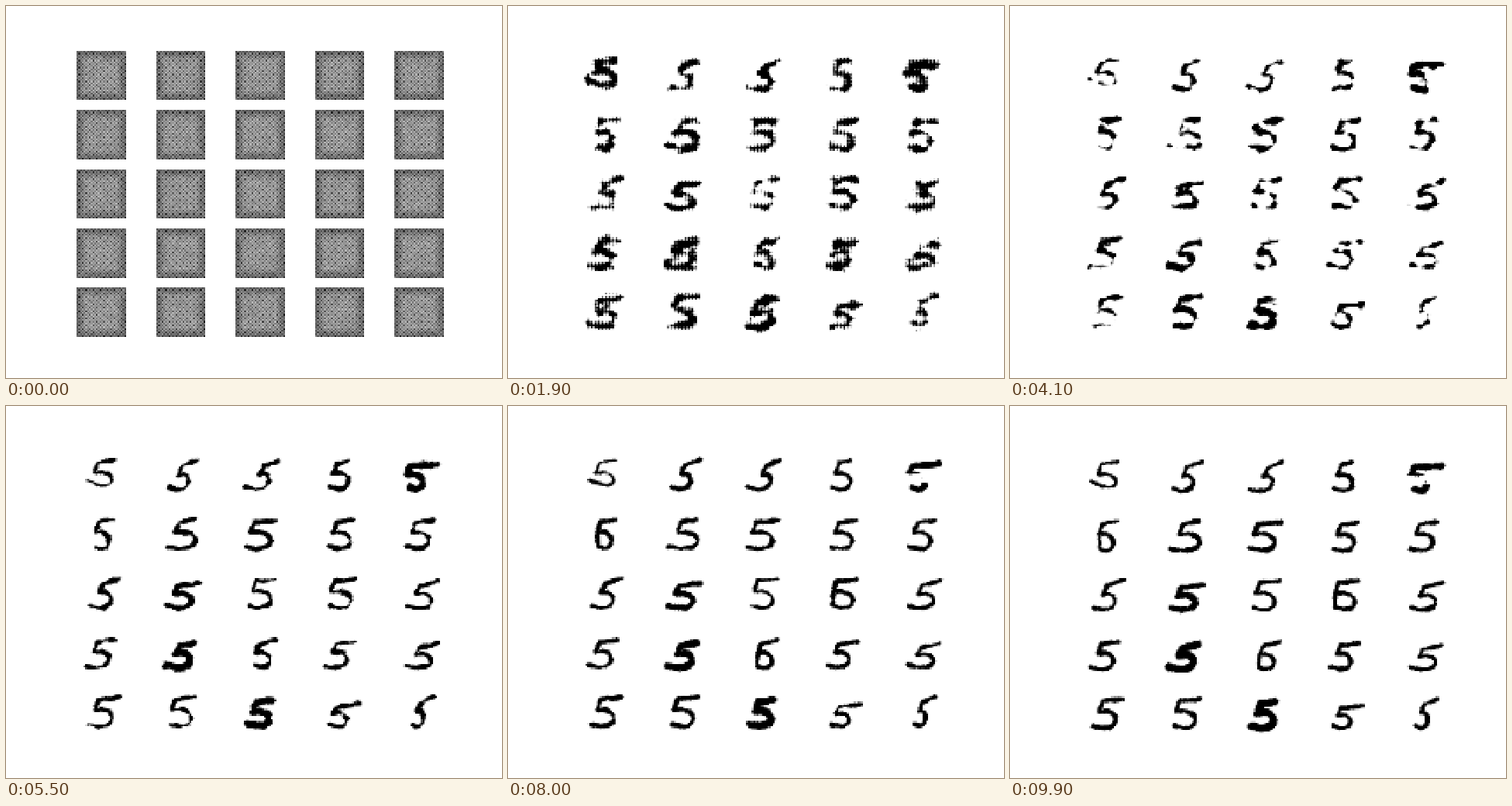
An HTML page with a canvas that plays this animation: 640x480 px, repeating every 10000 ms.

```html
<!DOCTYPE html>
<html lang="en">
<head>
<meta charset="utf-8">
<title>Digits learning to form</title>
<style>
html, body { margin: 0; width: 100%; height: 100%; overflow: hidden; background: #fff; }
canvas { display: block; }
</style>
</head>
<body>
<canvas id="stage" width="640" height="480"></canvas>
<script>
const N = 28, SIZE = 63.72;
const ctx = document.getElementById('stage').getContext('2d');
ctx.imageSmoothingEnabled = false;
const tile = document.createElement('canvas');
tile.width = tile.height = N;
const tileCtx = tile.getContext('2d');
const image = tileCtx.createImageData(N, N);

// Each digit: bar tip x, bar tip y, corner x, bowl right x, tail x
const digits = [
  [21, 5.2, 12, 20, 6], [24, 5.2, 15, 18.5, 7.5], [24, 5.2, 16, 18.5, 6], [18.5, 5.5, 12.5, 19, 8.5], [24.5, 7.5, 9, 16, 9],
  [21, 5.3, 12.5, 18.5, 11], [21.5, 5.3, 13, 22.5, 6], [23.5, 6, 10.5, 20, 6], [22.5, 5.8, 12.5, 20, 8], [21.5, 6, 12, 19.5, 7],
  [24.5, 5, 15, 19.5, 7.5], [24, 8, 12, 20, 6], [22.5, 5.5, 11.5, 20, 8], [22.5, 5.5, 11, 20.5, 9], [25, 6.5, 14.5, 21, 7],
  [21.5, 6.5, 12, 18.5, 6], [22, 8, 13, 19, 5], [22.5, 6.8, 13.5, 19.5, 11], [23, 7.5, 12, 18, 6], [24.5, 8.5, 14, 21, 7],
  [24, 5.5, 12.5, 20, 7], [22.5, 5.5, 11, 20, 8], [20, 7, 12, 19, 7], [25, 9.5, 12.5, 18, 8], [22, 5.5, 15, 16.5, 10]
];
const blobInk = [9, 3, 5, 3, 6, 3, 9, 5, 5, 3, 6, 4, 2, 7, 9, 8, 9, 6, 8, 6, 7, 7, 4, 4, 3];
const extraWeight = { 0: -.3, 4: .6, 11: .4, 12: -.2, 16: .9, 22: .9, 24: -.1 };
const closedBowl = [5, 13, 17];

const clamp = v => Math.max(0, Math.min(1, v));
const mix = (a, b, t) => a + (b - a) * t;
const smooth = t => t * t * (3 - 2 * t);

function track(keys, f) {
  if (f <= keys[0][0]) return keys[0][1];
  for (let i = 1; i < keys.length; i++) {
    const [a, u] = keys[i - 1], [b, v] = keys[i];
    if (f <= b) return mix(u, v, (f - a) / (b - a));
  }
  return keys[keys.length - 1][1];
}

function hash(x, y, z, seed) {
  let h = Math.imul(x + 11, 374761393) ^ Math.imul(y + 23, 668265263)
    ^ Math.imul(z + 37, 2147483647) ^ Math.imul(seed + 5, 1274126177);
  h = Math.imul(h ^ (h >>> 13), 1103515245);
  h = Math.imul(h ^ (h >>> 15), 1597334677);
  return ((h ^ (h >>> 16)) >>> 0) / 2147483648 - 1;
}

function noise(x, y, z, seed) {
  const i = Math.floor(x), j = Math.floor(y), k = Math.floor(z);
  const u = smooth(x - i), v = smooth(y - j), w = smooth(z - k);
  const layer = n => mix(
    mix(hash(i, j, n, seed), hash(i + 1, j, n, seed), u),
    mix(hash(i, j + 1, n, seed), hash(i + 1, j + 1, n, seed), u), v);
  return mix(layer(k), layer(k + 1), w);
}

function skeleton([ax, ay, bx, dx, fx], index) {
  const by = ay + Math.max(1, (bx - 10) * .6);
  const cx = bx - 2, cy = by * .5 + 9.3;
  const fy = index ? 20.8 : 16.5;
  const pull = (8 * dx - cx - fx) / 6;
  const points = [[ax, ay], [bx, by], [cx, cy]];
  for (let i = 1; i <= 8; i++) {
    const t = i / 8, s = 1 - t;
    const curve = (a, b, c, d) => s * s * s * a + 3 * s * s * t * b + 3 * s * t * t * c + t * t * t * d;
    points.push([curve(cx, pull, pull, fx), curve(cy, cy - 3, 26.5, fy)]);
  }
  return points;
}

function segmentDistance(x, y, [ax, ay], [bx, by]) {
  const dx = bx - ax, dy = by - ay;
  const t = clamp(((x - ax) * dx + (y - ay) * dy) / (dx * dx + dy * dy));
  return Math.hypot(x - ax - t * dx, y - ay - t * dy);
}

const skeletons = digits.map(skeleton);

function strokeDistance(index, x, y, f) {
  const p = skeletons[index];
  let d = 99;
  for (let i = 1; i < p.length; i++) d = Math.min(d, segmentDistance(x, y, p[i - 1], p[i]));
  if (f >= 60 && closedBowl.includes(index)) d = Math.min(d, segmentDistance(x, y, p[p.length - 1], p[2]));
  if (f >= 60 && index === 4 && y > 12.5 && y < 18.5) d += 2;
  return d;
}

// Untrained output: a woven grey texture, darker at the rim
function weave(index, x, y) {
  const rim = Math.min(x, y, 27 - x, 27 - y);
  const dark = (x % 4 === 1 && y % 4 === 1) || (x % 4 === 3 && y % 4 === 3);
  const light = (x + y) % 2 ? -.07 : .06;
  return .41 + .2 * Math.max(0, 1 - rim / 5) + (dark ? .25 : light) + .07 * hash(x, y, 0, index);
}

function drawTile(index, f) {
  const shift = f > 10 && f % 12 < 4 ? 1 : 0;
  const grey = 1 - clamp(f / 9);
  const formed = smooth(clamp((f - 10) / 17));
  const weight = track([[10, 1.3], [29, .9], [55, 1.15], [99, 1.25]], f) + (extraWeight[index] || 0);
  const rough = track([[10, 1.6], [29, 2.6], [42, 1.6], [55, .9], [75, .75], [99, .5]], f);
  const grain = track([[10, .15], [55, .2], [69, .55], [80, .2]], f);

  for (let y = 0; y < N; y++) for (let x = 0; x < N; x++) {
    const px = x + .5, py = y + .5 - shift;
    const d = strokeDistance(index, px, py, f);
    const n = rough * noise(px / 4, py / 2.5, f / 14, index) + grain * hash(x, y, f, index);
    let ink = (weight - d + n) * 1.2 + .5;
    if (formed < 1) {
      const outside = Math.max(Math.abs(px - 13.5) - 8, Math.abs(py - 13.5) - 9.5, 0);
      const body = Math.min(3.5 - d * .6 + (blobInk[index] - 6) * .5, 2.5 - outside * 1.1);
      const stripes = (x % 2 - .5) * 1.8 + (y % 2 - .5) * .9;
      ink = mix((body + stripes + n * .7) * .6, ink, formed);
    }
    ink = mix(clamp(ink), weave(index, x, y), grey);
    const at = (y * N + x) * 4;
    image.data[at] = image.data[at + 1] = image.data[at + 2] = 255 * (1 - ink);
    image.data[at + 3] = 255;
  }
  tileCtx.putImageData(image, 0, 0);

  const x = 90.9 + 102.62 * (index % 5), y = 57.6 + 76.47 * Math.floor(index / 5);
  const left = Math.round(x), top = Math.round(y);
  ctx.drawImage(tile, left, top, Math.round(x + SIZE) - left, Math.round(y + SIZE) - top);
}

let shown = -1;
function tick() {
  const f = Math.floor(performance.now() / 100) % 100;
  if (f !== shown) {
    shown = f;
    ctx.fillStyle = '#fff';
    ctx.fillRect(0, 0, 640, 480);
    digits.forEach((_, i) => drawTile(i, f));
  }
  requestAnimationFrame(tick);
}
tick();
</script>
</body>
</html>
```
